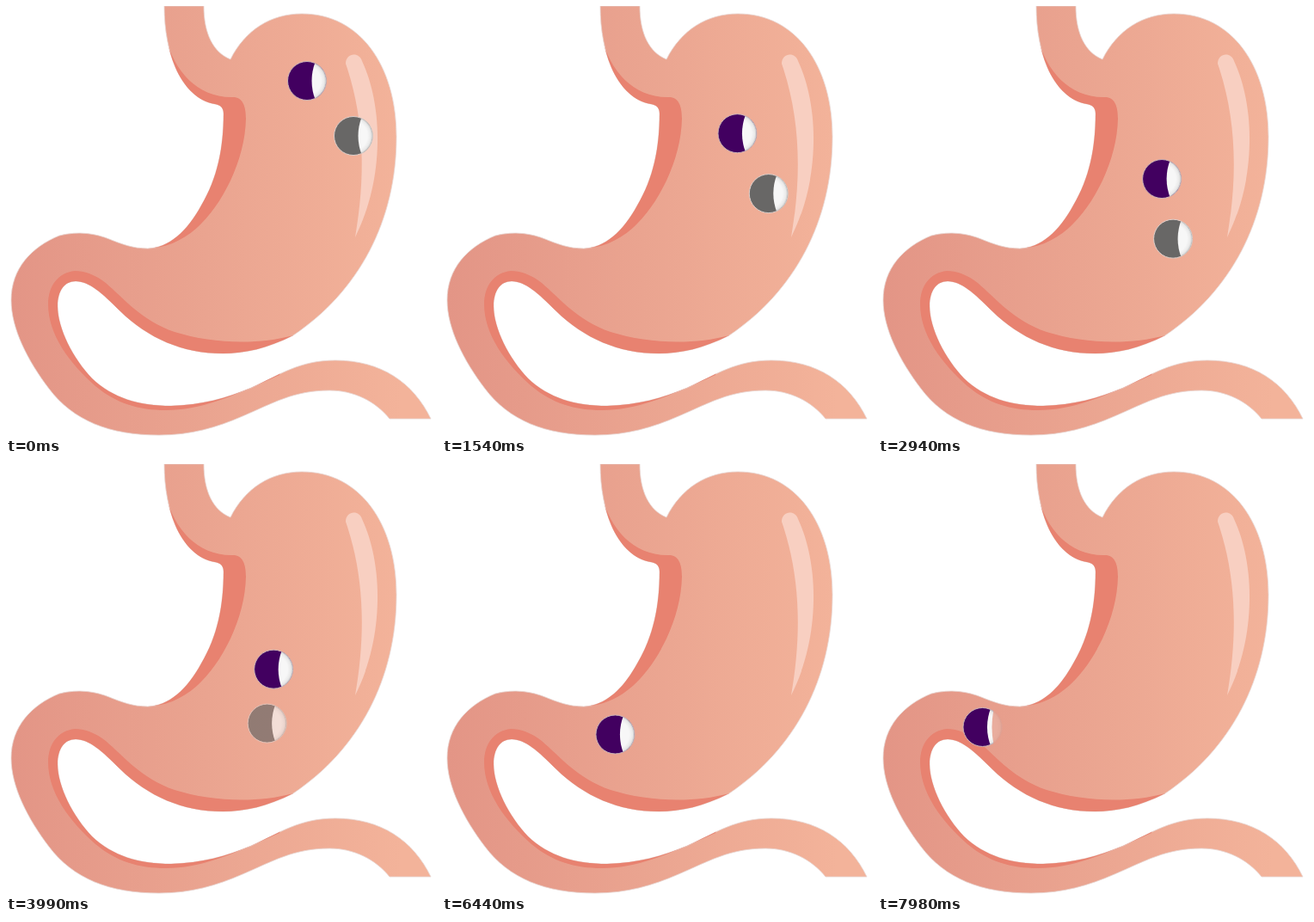
These frames come from a looping animation (500 px wide and 500 px high, 8000 ms). An HTML page:

```html
<!DOCTYPE html>
<html lang="en">
<head>
<meta charset="utf-8">
<title>Stomach</title>
<style>
  html, body { margin: 0; width: 100%; height: 100%; overflow: hidden; background: #fff; }
  svg { display: block; width: 100vw; height: 100vh; }
</style>
</head>
<body>
<svg viewBox="0 0 500 500">
  <defs>
    <linearGradient id="skin" gradientUnits="userSpaceOnUse" x1="6" y1="0" x2="460" y2="0">
      <stop offset="0" stop-color="#e39586"/>
      <stop offset=".5" stop-color="#eaa490"/>
      <stop offset="1" stop-color="#f3b39a"/>
    </linearGradient>
    <radialGradient id="shine" gradientUnits="userSpaceOnUse" cx="-1" cy="0" r="24">
      <stop offset=".72" stop-color="#f7f7f7"/>
      <stop offset=".88" stop-color="#e9e9e9"/>
      <stop offset="1" stop-color="#b9b9b9"/>
    </radialGradient>
    <path id="outline" d="M184,0 H230 C230,32 241,54 261,62 C278,28 308,9 344,9
      C412,9 454,70 454,152 C454,250 410,332 334,383
      C304,398 278,404 252,404 C205,404 165,386 133,355
      C112,334 97,320 81,320 C68,320 60,331 60,349
      C60,375 78,410 100,433 C124,456 155,465 192,465
      C228,464 256,456 285,444 C320,428 342,412 383,412
      C436,412 474,438 494,480 H446 C430,460 405,447 376,447
      C335,447 310,462 275,477 C245,490 215,499 178,499
      C120,499 78,482 50,445 C25,412 6,375 6,342
      C6,305 30,280 62,267 C85,261 105,265 120,271
      C135,277 148,282 165,282 C189,281 210,263 227,232
      C246,200 253,165 253,125 C253,118 249,115 243,114
      C204,107 184,56 184,0 Z"/>
    <clipPath id="inside"><use href="#outline"/></clipPath>
    <clipPath id="disc"><circle r="22.3"/></clipPath>
    <g id="crescent" clip-path="url(#disc)">
      <path d="M10,-23 Q1,0 10,23 H24 V-23 Z" fill="url(#shine)"/>
    </g>
  </defs>

  <use href="#outline" fill="url(#skin)" stroke="#e8d6d2" stroke-width=".8"/>
  <g clip-path="url(#inside)" fill="#e88270">
    <path d="M186,38 C196,75 222,107 264,106 C275,106 279,116 279,131
      C278,180 251,232 222,258 C200,277 178,284 152,281
      L150,270 L230,150 L180,60 Z"/>
    <path d="M334,383 C290,395 238,392 196,379 C158,366 138,341 116,322
      C103,312 91,308 80,308 C60,310 49,326 49,347
      C49,381 73,415 104,442 C128,462 154,470 186,470
      C225,470 262,455 318,429 L334,395 Z"/>
  </g>
  <path fill="#f8cfc1" d="M395,67 C395,54 411,53 414,64 C438,115 441,200 406,269
    C418,200 417,135 397,73 Z"/>

  <g id="grayBall">
    <circle r="22.5" fill="#686766" stroke="#dccfcb"/>
    <use href="#crescent"/>
  </g>
  <g id="purpleBall">
    <circle r="22.5" fill="#420060" stroke="#c9b4b8"/>
    <use href="#crescent"/>
    <path id="worn" d="M13,-20 Q9,0 13,20 Q23,13 23.5,0 Q23,-13 13,-20 Z" fill="#e69e8d"/>
  </g>
</svg>
<script>
  const LOOP = 8000, STEP = 70, SPAN = 1600;

  // Evenly timed key points; the first lies one span before the loop starts.
  const purpleKeys = [[353, 23], [350, 87], [343, 150.5], [326, 210.5],
                      [287.5, 266], [203.5, 314], [120.5, 305.5], [50, 240]];
  const grayKeys = [[418, 70], [404, 151], [378.5, 220.5], [334.5, 279],
                    [269, 319], [201.5, 332], [130, 330]];

  const byId = id => document.getElementById(id);
  const ramp = (t, from, to) => Math.min(1, Math.max(0, (t - from) / (to - from)));

  // Catmull-Rom curve through b and c
  const spline = (a, b, c, d, u) =>
    b + u / 2 * (c - a + u * (2 * a - 5 * b + 4 * c - d + u * (3 * (b - c) + d - a)));

  function place(ball, keys, t) {
    const i = Math.min(Math.floor(t / SPAN), keys.length - 4);
    const [a, b, c, d] = keys.slice(i, i + 4);
    const at = axis => spline(a[axis], b[axis], c[axis], d[axis], t / SPAN - i);
    ball.setAttribute('transform', `translate(${at(0)} ${at(1)})`);
  }

  const purple = byId('purpleBall'), gray = byId('grayBall'), worn = byId('worn');
  const start = performance.now();

  function draw(now) {
    const elapsed = Math.max(0, now - start) % LOOP;
    const t = Math.floor(elapsed / STEP) * STEP;
    place(purple, purpleKeys, t);
    place(gray, grayKeys, t);
    gray.setAttribute('opacity', 1 - ramp(t, 3000, 6100));
    worn.setAttribute('opacity', 0.85 * ramp(t, 6600, LOOP));
    requestAnimationFrame(draw);
  }
  draw(start);
</script>
</body>
</html>
```
